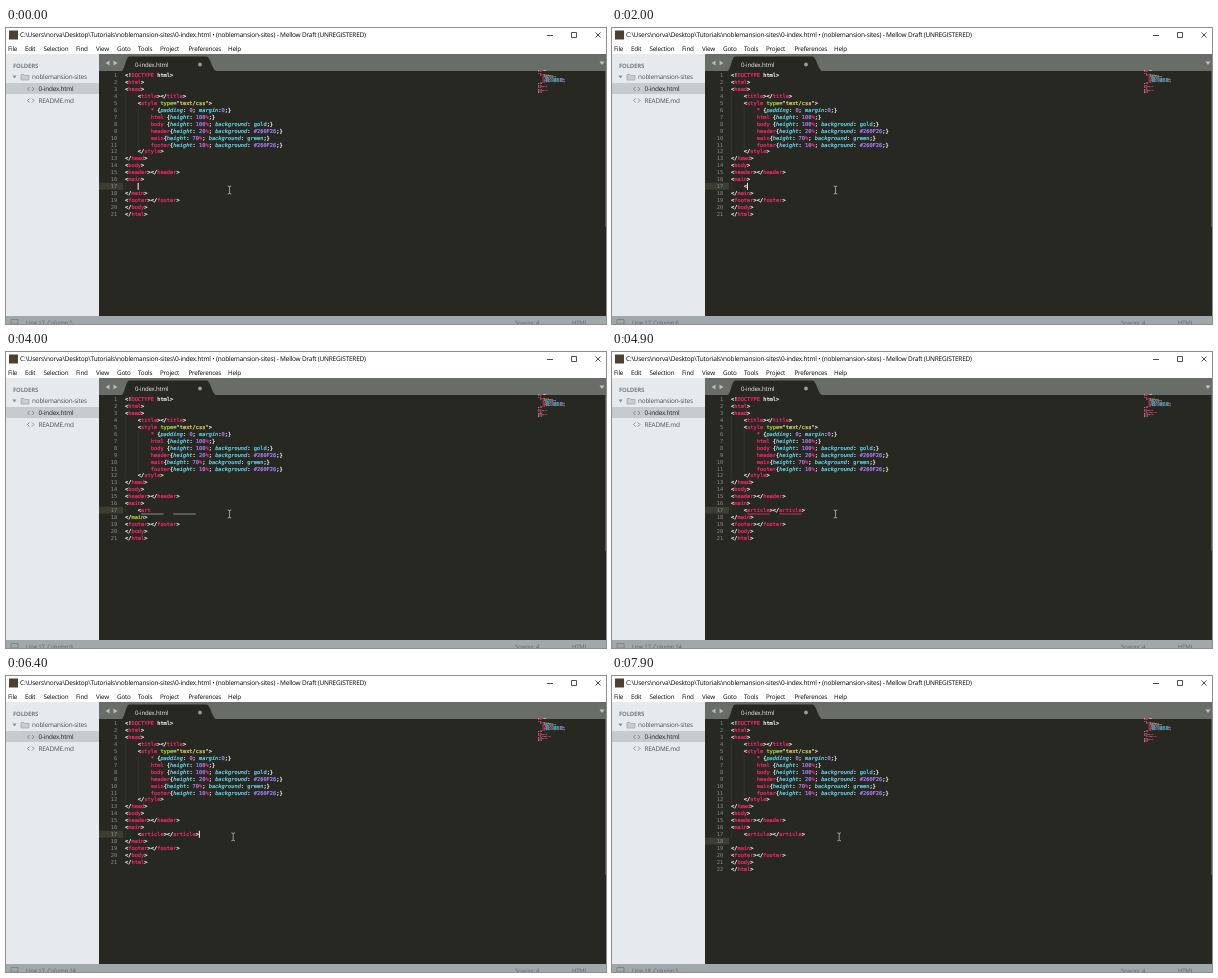
An HTML page for the animation above (8 s loop, 600x296 px).

```html
<!DOCTYPE html>
<html lang="en">
<head>
<meta charset="utf-8">
<title>Editor</title>
<style>
  html, body { margin: 0; width: 100%; height: 100%; overflow: hidden; }
  svg { display: block; width: 600px; height: 296px; }
  text { white-space: pre; text-rendering: geometricPrecision;
         font: 6.4px "Open Sans", "Noto Sans", sans-serif; letter-spacing: -.2px; }
  .code text { font: 5.35px "DejaVu Sans Mono", "Noto Sans Mono", monospace; letter-spacing: 0; }
  #code tspan { fill: currentColor; stroke: currentColor; }
  .w { color: #f8f8f2 } .p { color: #f92672 } .g { color: #a6e22e } .y { color: #e6db74 }
  .u { color: #ae81ff } .c { color: #66d9ef } .i { color: #66d9ef; font-style: italic }
</style>
</head>
<body>
<svg viewBox="0 0 600 296" stroke-width=".2">
  <rect width="600" height="296" fill="#fff"/>
  <rect x="3" y="2.5" width="9" height="9" fill="#4d4030"/>
  <text x="14" y="9.4" style="font-size:6.5px">C:\Users\norva\Desktop\Tutorials\noblemansion-sites\0-index.html • (noblemansion-sites) - Mellow Draft (UNREGISTERED)</text>
  <path d="M541 7.500h6M565.500 4.500h5v5h-5zM589.500 4.500l5 5m0-5l-5 5" fill="none" stroke="#222" stroke-width=".8"/>
  <g id="menu"></g>

  <rect y="26" width="93" height="262" fill="#e6eaed"/>
  <rect y="55" width="93" height="11" fill="#c6cbd0"/>
  <g fill="#4b5156">
    <text x="7" y="39.500" style="font-size:6px;font-weight:bold" fill="#777e84">FOLDERS</text>
    <path d="M6.500 47.500h4l-2 3z" fill="#858c91"/>
    <path d="M15 46.500h3l1 1h4v4.500h-8z" fill="#c9ced2" stroke="#9ba1a6" stroke-width=".7"/>
    <text x="26" y="51.400">noblemansion-sites</text>
    <text x="32.500" y="63.200" fill="#222">0-index.html</text>
    <text x="32.500" y="74.700">README.md</text>
    <path d="M23.500 59l-2 2 2 2m2.500-4l2 2-2 2M23.500 70.500l-2 2 2 2m2.500-4l2 2-2 2" fill="none" stroke="#757c82" stroke-width=".8"/>
  </g>

  <rect x="93" y="26" width="507" height="17" fill="#696d67"/>
  <rect x="93" y="43" width="507" height="245" fill="#272822"/>
  <path d="M115.500 43C119 42 119.500 28.500 123.500 28.500H200.500C204.500 28.500 206 42 210 43z" fill="#272822"/>
  <path d="M103.500 32.500v5l-4-2.500zM107.500 32.500v5l4-2.500z" fill="#b9bbb7"/>
  <path d="M593.500 33.500h5l-2.500 3.500z" fill="#c4c6c2"/>
  <text x="129" y="38.600" fill="#f0f0ec" style="font-size:6.1px">0-index.html</text>
  <circle cx="194" cy="36.500" r="1.900" fill="#999b95"/>
  <rect x="599" y="43" width="1" height="156" fill="#55564f"/>

  <rect id="row" x="93" width="24" height="6.950" fill="#3e3d32"/>
  <path d="M119.300 64.500V127M132.200 78.500V120M119.300 155V161.500" stroke="#4a4b44" stroke-width=".7" stroke-dasharray="1 1"/>
  <g class="code" id="numbers" fill="#8f908a" text-anchor="end"></g>
  <g class="code" id="code"></g>
  <use href="#code" transform="translate(511.800 35.700) scale(.17 .157)" stroke-width="1"/>
  <g id="underline">
    <rect x="135.100" y="161.600" width="22.500" height=".8"/>
    <rect x="167.300" y="161.600" width="22.500" height=".8"/>
  </g>
  <rect id="caret" width="1" height="7" fill="#f8f8f0"/>
  <path id="mouse" d="M-1.800-4Q0-4 0-3Q0-4 1.800-4M0-3V3M-1.800 4Q0 4 0 3Q0 4 1.800 4" fill="none" stroke="#ccc" stroke-width=".7"/>

  <rect y="288" width="600" height="8" fill="#a1a8ac"/>
  <g fill="#5d646a">
    <path d="M5 291.500h7v4.500h-7z" fill="none" stroke="#767d82" stroke-width=".8"/>
    <text id="status" x="20" y="296.500" style="font-size:6px"></text>
    <text x="509" y="296.500" style="font-size:6px">Spaces: 4</text>
    <text x="566" y="296.500" style="font-size:6px">HTML</text>
  </g>
</svg>
<script>
const LOOP = 8000, CHAR = 3.22, LINE = 6.95, LEFT = 119, BASE = 49;
const el = id => document.getElementById(id);
const put = (node, attrs) => { for (const k in attrs) node.setAttribute(k, attrs[k]); };
const escape = s => s.replace(/&/g, '&amp;').replace(/</g, '&lt;');
const baseline = n => BASE + (n - 1) * LINE;

// "~k" switches to colour class k
const open = name => `<~p${name}~w>`;
const close = name => `</~p${name}~w>`;
const pair = name => open(name) + close(name);
const rule = (name, height, back) => `        ~p${name}~w{~iheight~w: ~u${height}~p%~w;` +
  (back ? ` ~ibackground~w: ~${back}~w;}` : '}');

const head = [
  '<!~pDOCTYPE~w html>', open('html'), open('head'),
  '    ' + pair('title'),
  '    <~pstyle~w ~gtype~w=~y"text/css"~w>',
  '        ~p*~w {~ipadding~w: ~u0~w; ~imargin~w:~u0~w;}',
  rule('html ', 100), rule('body ', 100, 'cgold'), rule('header', 20, 'u#260F26'),
  rule('main', 70, 'cgreen'), rule('footer', 10, 'u#260F26'),
  '    ' + close('style'), close('head'), open('body'), pair('header'), open('main')
];
const tail = [pair('footer'), close('body'), close('html')];

// Each key press: time, typed text, cursor column, cursor line
const article = pair('article');
const steps = [
  [0, '', 5], [1600, '<', 6], [2900, '<~pa', 7], [3500, '<~par', 8], [3800, '<~part', 9],
  [4100, article, 14], [6000, article, 24], [7000, article, 5, 18]
].map(([time, typed, column, line = 17]) => ({ time, typed, column, line }));

function drawLine(source, i) {
  const spans = ('w' + source).split('~')
    .map(s => `<tspan class="${s[0]}">${escape(s.slice(1))}</tspan>`).join('');
  return `<text x="${LEFT}" y="${baseline(i + 1)}">${spans}</text>`;
}

function drawStep({ typed, column, line }) {
  const unclosed = /~p[a-z]+$/.test(typed);
  const lines = [...head, '    ' + typed, ...(line === 18 ? ['    '] : []),
    unclosed ? '</~gmain~w>' : close('main'), ...tail];
  el('code').innerHTML = lines.map(drawLine).join('');
  el('numbers').innerHTML = lines.map((_, i) =>
    `<text x="111.200" y="${baseline(i + 1)}">${i + 1}</text>`).join('');
  put(el('row'), { y: baseline(line) - 5.5 });
  put(el('caret'), { x: LEFT + (column - 1) * CHAR - .2, y: baseline(line) - 5.4 });
  el('status').textContent = `Line ${line}, Column ${column}`;
}

el('menu').innerHTML = Object.entries({ File: 2, Edit: 19, Selection: 37.5, Find: 70, View: 90,
  Goto: 111, Tools: 132, Project: 154, Preferences: 182.5, Help: 222 })
  .map(([name, x]) => `<text x="${x}" y="22.500" style="font-size:6.3px">${name}</text>`).join('');

let shown;
function frame(now) {
  const t = now % LOOP;
  const step = steps.findLast(s => s.time <= t);
  if (step !== shown) drawStep(shown = step);
  put(el('caret'), { opacity: (t - step.time) % 1000 < 500 && !(t >= 4000 && t < 4100) ? 1 : 0 });
  put(el('underline'), { opacity: t >= 4000 && t < 6000 ? 1 : 0, fill: t < 4100 ? '#a9a9a2' : '#f92672' });
  const k = Math.min(1, Math.max(0, (t - 5600) / 300));
  put(el('mouse'), { transform: `translate(${223.5 + 3.7 * k} ${162 - 1.2 * k})` });
  requestAnimationFrame(frame);
}
requestAnimationFrame(frame);
</script>
</body>
</html>
```
